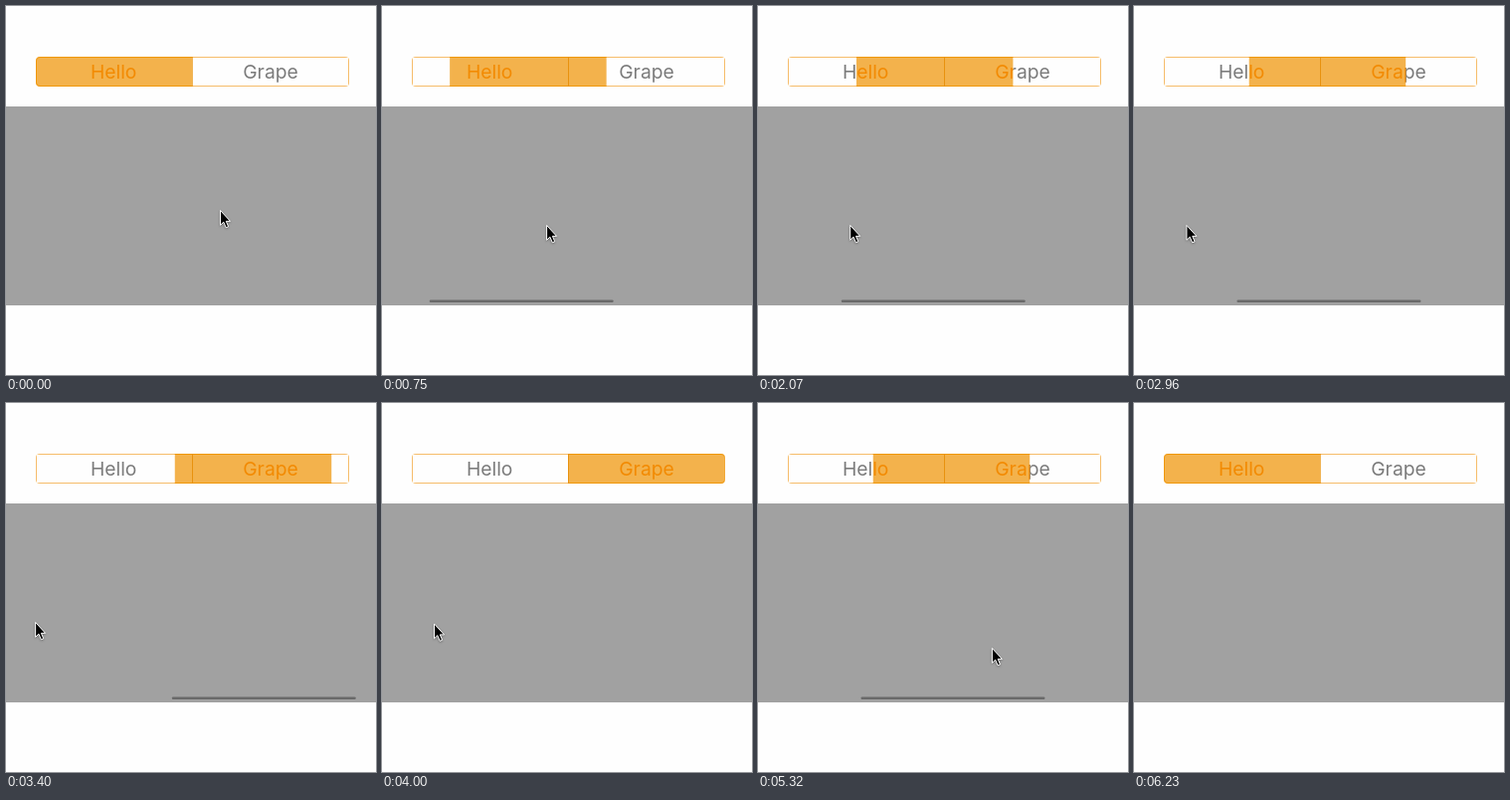
Recreate the animation shown at these times as an HTML page. Size 372 by 371 pixels, loop 6300 ms.

```html
<!DOCTYPE html>
<html lang="en">
<head>
<meta charset="utf-8">
<title>Sliding segmented control</title>
<style>
  html, body { margin: 0; width: 100%; height: 100%; overflow: hidden; background: #fefefe; }
  svg { display: block; width: 372px; height: 371px; }
  text { font: 400 19.3px Inter, Roboto, sans-serif; text-anchor: middle; }
  #pointer { filter: drop-shadow(0 1px 1px rgba(0, 0, 0, .3)); }
</style>
</head>
<body>
<svg viewBox="0 0 372 371">
  <defs>
    <clipPath id="frame"><rect x="30" y="51" width="315" height="30" rx="4"/></clipPath>
    <clipPath id="window"><rect id="pill" y="51" width="157.5" height="30"/></clipPath>
    <g id="labels">
      <text x="108.2" y="73">Hello</text>
      <text x="266" y="73">Grape</text>
    </g>
  </defs>

  <rect x="30.5" y="51.5" width="314" height="29" fill="#fefefe" stroke="#f6bd6b" clip-path="url(#frame)"/>
  <use href="#labels" fill="#7b7b7b"/>

  <g clip-path="url(#window)">
    <rect x="30.5" y="51.5" width="314" height="29" rx="3.5" fill="#f3b24c" stroke="#f0980c"/>
    <path d="M187.5 51V81" stroke="#e8920f"/>
    <use href="#labels" fill="#f28a02"/>
  </g>

  <rect y="101" width="372" height="200" fill="#a1a1a1"/>
  <rect id="bar" y="295.5" width="185" height="2.5" rx="1.25" fill="#6a6a6a"/>
  <path id="pointer" d="M.5 .5V15.3l3.3-3.1 2.4 5.6 2.4-1-2.3-5.4H10.5z"
        fill="#000" stroke="#fff" stroke-linejoin="round"/>
</svg>

<script>
const LOOP = 6300, HOLD = 300, STEP = 147.4, PAGE = 372;

const $ = id => document.getElementById(id);
const pill = $("pill"), bar = $("bar"), pointer = $("pointer");

const ramp = (n, a, b) => Math.min(1, Math.max(0, (n - a) / (b - a)));
const easeIn = t => t * t;
const easeOut = t => 1 - (1 - t) ** 3;

// The picture advances in discrete steps after a short rest
const stepAt = t => t < HOLD ? 0 : 1 + Math.floor((t - HOLD) / STEP);

function draw(n) {
  const r = (a, b) => ramp(n, a, b);

  // Share of the page dragged forward by hand, then back by hand
  const out = .486 * r(2, 6) - .175 * r(6, 8) + .128 * r(8, 13) + .19 * easeIn(r(13, 21));
  const back = .454 * r(29, 35);

  // After each release the page glides to rest
  const f = out + .371 * easeOut(r(21, 24)) - back - .546 * easeOut(r(35, 39));

  const approach = r(0, 2), leave = r(35, 40);
  const x = 215 + 40.5 * approach - PAGE * out + 30.5 * r(21, 25)
    + 14 * r(26, 29) + PAGE * back + 122 * leave;
  const y = 205 + 15 * approach + 6 * r(25, 29) + 20 * r(29, 35) + 116 * leave;

  pill.setAttribute("x", 30 + 157 * f);
  bar.setAttribute("x", 3 + 184 * f);
  bar.setAttribute("opacity", r(2, 3) - r(23, 25) + r(29, 30) - r(38, 40));
  pointer.setAttribute("transform", `translate(${x} ${y})`);
  pointer.setAttribute("opacity", n > 40 ? 0 : 1);
}

const begin = performance.now();
function tick() {
  draw(stepAt((performance.now() - begin) % LOOP));
  requestAnimationFrame(tick);
}
tick();
</script>
</body>
</html>
```
